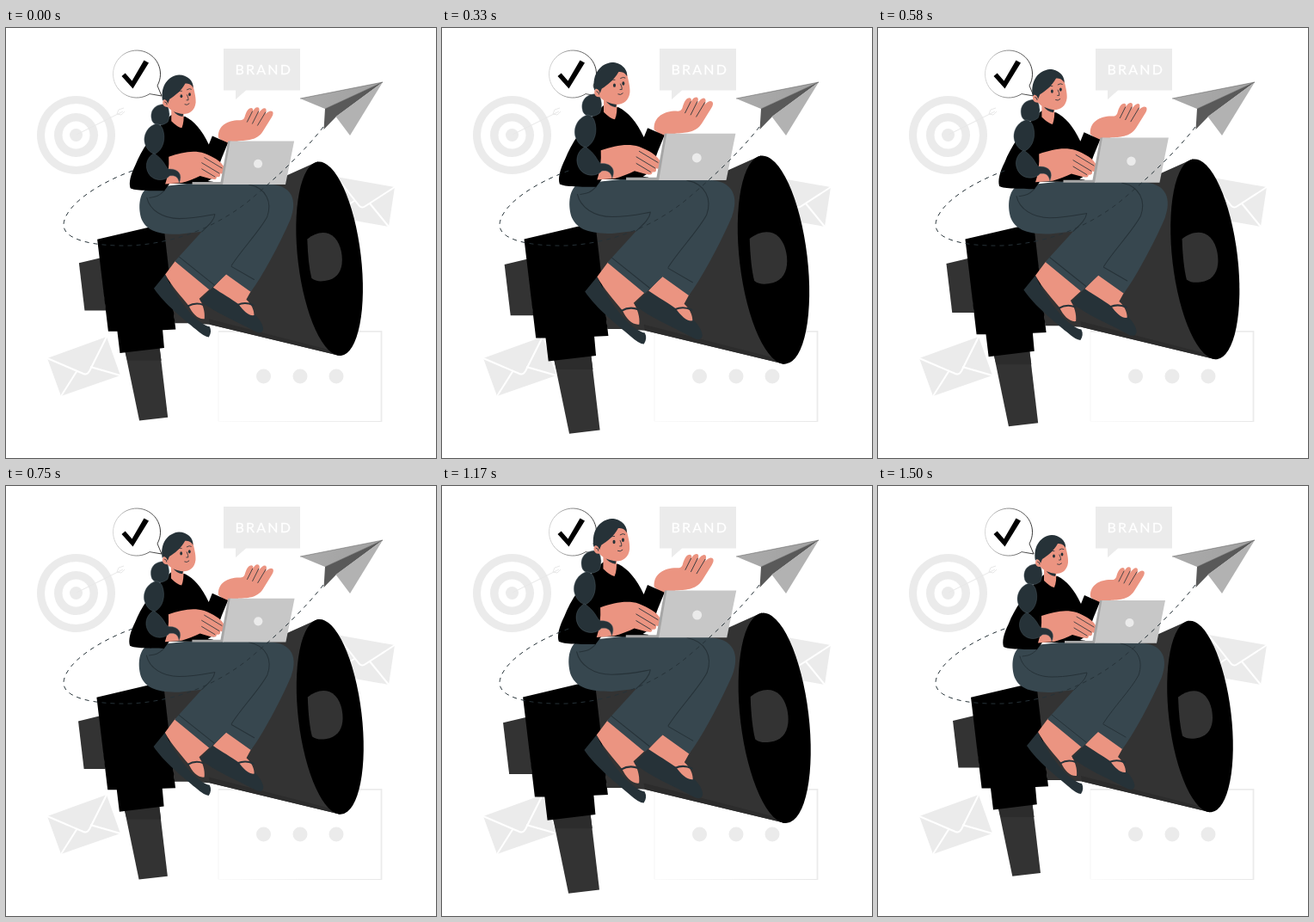
An HTML page for the animation above (1540 ms loop, 500 by 500 pixels).

```html
<!DOCTYPE html>
<html lang="en">
<head>
<meta charset="utf-8">
<title>Megaphone pulse</title>
<style>
  html, body { margin: 0; width: 100%; height: 100%; overflow: hidden; background: #fff; }
  svg { display: block; width: 100%; height: 100%; }
  .pale { fill: #ebebeb; }
  .white { fill: #fff; }
  .fold { fill: none; stroke: #fff; stroke-width: 2; }
  .dark { fill: #333; }
  .shade { fill: #2c2c2c; }
  .pants { fill: #37474f; }
  .ink { fill: #263238; }
  .skin { fill: #eb9481; }
  .line { fill: none; stroke: #263238; stroke-width: 1; stroke-linecap: round; stroke-linejoin: round; }
  .fine { stroke-width: .8; }
  .strap { stroke-width: 2; }
  .rim { stroke: #53636b; stroke-width: .4; }
  .brand { font: 400 16px Lato, sans-serif; letter-spacing: 2.2px; fill: #fff; stroke: #fff; stroke-width: .3; }
</style>
</head>
<body>
<svg viewBox="0 0 500 500">
  <defs>
    <linearGradient id="wing">
      <stop offset="0" stop-color="#ababab"/>
      <stop offset="1" stop-color="#a0a0a0"/>
    </linearGradient>
    <linearGradient id="edge">
      <stop offset="0" stop-color="#fafafa"/>
      <stop offset="1" stop-color="#e8e8e8"/>
    </linearGradient>
    <linearGradient id="outline">
      <stop offset="0" stop-color="#ccc"/>
      <stop offset=".6" stop-color="#555"/>
      <stop offset="1" stop-color="#000"/>
    </linearGradient>
  </defs>

  <g id="backdrop">
    <g id="target">
      <circle class="pale" cx="81.5" cy="124.5" r="45.5"/>
      <circle class="white" cx="81.5" cy="124.5" r="36.5"/>
      <circle class="pale" cx="81.5" cy="124.5" r="25.5"/>
      <circle class="white" cx="81.5" cy="124.5" r="16"/>
      <circle class="pale" cx="81.5" cy="124.5" r="7.5"/>
      <path d="M82 124L136 97M129 100L131 95L137 93M129 100L134 101L138 97" fill="none" stroke="#e8e8e8"/>
    </g>
    <path class="pale" d="M253 24H342V72.5H279L267 83V72.5H253Z"/>
    <text class="brand" x="266.5" y="54">BRAND</text>

    <path class="pale" d="M384 173L452 185L445 231L377 219Z"/>
    <path class="fold" d="M384 173L411 207Q414 210 418 207L452 185M377 219L405 201M423 204L445 231"/>
    <path class="pale" d="M48 384L117 359L133 404L64 428Z"/>
    <path class="fold" d="M48 384L90 402Q94 404 97 399L117 359M64 428L83 398M98 394L133 404"/>

    <path d="M247 353V457" stroke="#f5f5f5"/>
    <path d="M247 457H437V458H247Z" fill="url(#edge)"/>
    <path d="M247 352.8H436.5V458" fill="none" stroke="#ebebeb" stroke-width="1.8"/>
    <circle class="pale" cx="299.5" cy="405" r="8.5"/>
    <circle class="pale" cx="342" cy="405" r="8.5"/>
    <circle class="pale" cx="384" cy="405" r="8.5"/>
  </g>

  <path d="M176 67L181 79L167 76.6A27.5 27.5 0 1 1 176 67Z" fill="#fff" stroke="url(#outline)" stroke-width=".8"/>
  <path d="M134.5 56L138.7 52.500L146.500 61.500L160.500 37.500L166 40.500L147.500 70.500Z"/>

  <g id="pulse">
    <g id="megaphone">
      <path class="dark" d="M87 273L112 267L118 327.500H93.500Z"/>
      <path class="dark" d="M140 375L156.300 453.800L189 450L179.500 370Z"/>
      <path class="shade" d="M140 375L179.500 370L181.500 385H142.500Z"/>
      <path class="dark" d="M184 236L361 156.500L386 379.300L237 343.500L212 342H197Z"/>
      <path class="shade" d="M236 337L384 375L386 379.300L237 343.500Z"/>
      <path d="M108 245.800L184 228L198 349.300L183 350L184.800 370.300L134 376.400L131 351.500H120.600Z"/>
      <ellipse cx="374.500" cy="268" rx="36.200" ry="112" transform="rotate(-6.800 374.500 268)"/>
      <path class="dark" d="M349 245.500C357 239 366 236.500 374 239.500C384 243.500 389 257 389 269.500C389 281 384 289.500 374 292.500C366 294.500 359 294.500 354 290.500Q350 275 349 245.500Z"/>
    </g>

    <g id="legs">
      <path class="ink" d="M186 286L173 302C185 320 208 338 221 349Q231 358 236 358Q240 352 237 346C226 344 205 325 186 286Z"/>
      <path class="skin" d="M198 270L186 286C193 299 205 312 213 322C217 331 224 338 231 337C232 329 229 320 225 314L238 302Z"/>
      <path class="line strap" d="M212 322.500C218 319 225 319 230 321"/>
      <path class="ink" d="M241 301L226 316C242 330 268 340 288 351Q297 356 298.500 349C298 342 293 336 287 330L270 318Z"/>
      <path class="skin" d="M256 285L241 301C251 308 262 314 270 320C276 328 282 334 288 333C288 327 285 320 279 315L285 304Z"/>
      <path class="line strap" d="M269 321C275 318.500 282 319 287 321.500"/>
      <path class="pants" d="M165 187C155 194 155 212 159 223C165 236 178 240 202 240L228 237L197 271L237 304L256 286L284 306C296 291 318 250 330 222C337 203 334 182.500 302 182.500L215 181.500Z"/>
      <path class="line" d="M282 183C302 187 309 203 303 220C294 237 274 257 262 276M185 190C178 197 175 197 168 198M165 198C168 212 183 222 202 222C220 222 232 219 243 217C242 225 234 231 228 237M202 266L242 298M262 277L288 292"/>
    </g>

    <g id="body">
      <path class="skin" d="M247 129C246 117 255 110 268 109C273 109 275 110 277 106C279 99 281 95 285 95Q288 96 286 100Q289 93 293 94.500Q295 96 293 101Q298 94 301 95.500Q303 97 301 102Q306 97 309 99Q311 101 308 106L298 122C291 133 279 132 270 133L257 137Z"/>
      <path class="line fine" d="M286 99L280 111M293 99L286 113M301 100L292 115"/>
      <path d="M193 103L185 110C172 124 158 144 152 160C146 172 144 181 146 187C151 190 170 190 185 190L191 182H240L251 152L258 135L240 127L236 137C228 120 219 110 209 105Z"/>
      <path class="skin" d="M193 95V110Q200 117 205 118Q208 111 207 99Z"/>
      <path class="ink" d="M195 98Q199 104 206 105L207 101Z"/>
      <path class="skin" d="M190 151C205 146 218 143 231 147C241 151 250 156 253 162L254 168Q252 172 249 170Q250 175 245 174Q245 178 240 177L226 173C220 176 212 179 205 181L186 182.500Q191 168 190 151Z"/>
      <path class="line fine" d="M231 152L251 164M228 158L248 170M228 165L243 174"/>
    </g>

    <g id="hair">
      <path class="ink rim" d="M188 91C174 89 167 99 171 110C174 116 183 116 189 111Q193 102 188 91Z"/>
      <path class="ink rim" d="M176 113C164 116 159 130 164 139Q167 146 174 148C184 143 187 130 183 119Q181 114 176 113Z"/>
      <path class="ink rim" d="M173 147C163 153 162 165 169 173C176 180 187 178 191 173C197 172 201 174 202 181C206 172 202 165 191 165C186 165 187 156 173 147Z"/>
    </g>

    <g id="head">
      <path class="skin" d="M187 73C190 62 212 60 217.500 68C219 74 221.500 83 221 89C220 98 214 102 207 102C199 101 192 98 189 94C182 95 181 85 187 84Z"/>
      <path class="ink" d="M183 87C180 69 190 58 202 57C211 57 219 64 218 72C216 68 213 67 209 67C204 76 197 81 191 85L189 90C188 85 184 84 183 87Z"/>
      <path class="line fine" d="M200 77Q203 74.500 205 75.500M211 74Q214 72 216 73.500M211 80Q213 84 212.500 86L210.500 86M185.500 88Q188 88 188 91M208.500 91Q211 92.500 213.500 90"/>
      <ellipse class="ink" cx="204.500" cy="81.500" rx="1.400" ry="2"/>
      <ellipse class="ink" cx="214" cy="79.500" rx="1.400" ry="2"/>
    </g>

    <g id="laptop">
      <path class="white" d="M235 179L239 176.500L250 178V181Z"/>
      <path fill="#a6a6a6" d="M217 180H251V182.800H217ZM258 133H262L253 182.800H249Z"/>
      <path fill="#c7c7c7" d="M260.500 133H334L324 182.800H252Z"/>
      <circle class="pale" cx="292.500" cy="159" r="5"/>
    </g>
  </g>

  <g id="plane">
    <path fill="none" stroke="#263238" stroke-dasharray="5 5" d="M369 115C345 146 310 178 280 203C245 230 200 250 145 253C100 254 66 246 67 228C69 206 107 180 150 165"/>
    <path fill="url(#wing)" d="M342 82L438 63L371 94Z"/>
    <path fill="#595959" d="M371 94L438 63L384 103L369.500 118Z"/>
    <path fill="#b2b2b2" d="M383.500 103L438 63L400 125Z"/>
    <path d="M342 82L438 63L371 94" fill="none" stroke="#555" stroke-width=".5"/>
  </g>
</svg>
<script>
  const LOOP = 1540, FPS = 24, LAST = 36;
  // time in ms, scale
  const beats = [[-40, 1], [262, 1.1], [860, 1], [1160, 1.1], [1500, 1], [1540, 1.013]];
  const pulse = document.getElementById('pulse');

  function scaleAt(t) {
    const i = beats.findIndex(b => t < b[0]);
    const [t0, s0] = beats[i - 1], [t1, s1] = beats[i];
    return s0 + (s1 - s0) * (t - t0) / (t1 - t0);
  }

  function draw(now) {
    // the motion advances in steps of 1/24 s
    const step = Math.min(LAST, Math.floor((now % LOOP) * FPS / 1000 + 0.13));
    const s = scaleAt(step * 1000 / FPS);
    pulse.setAttribute('transform', `translate(250 250) scale(${s.toFixed(4)}) translate(-250 -250)`);
  }

  let start;
  function tick(now) {
    start ??= now;
    draw(now - start);
    requestAnimationFrame(tick);
  }
  draw(0);
  requestAnimationFrame(tick);
</script>
</body>
</html>
```
